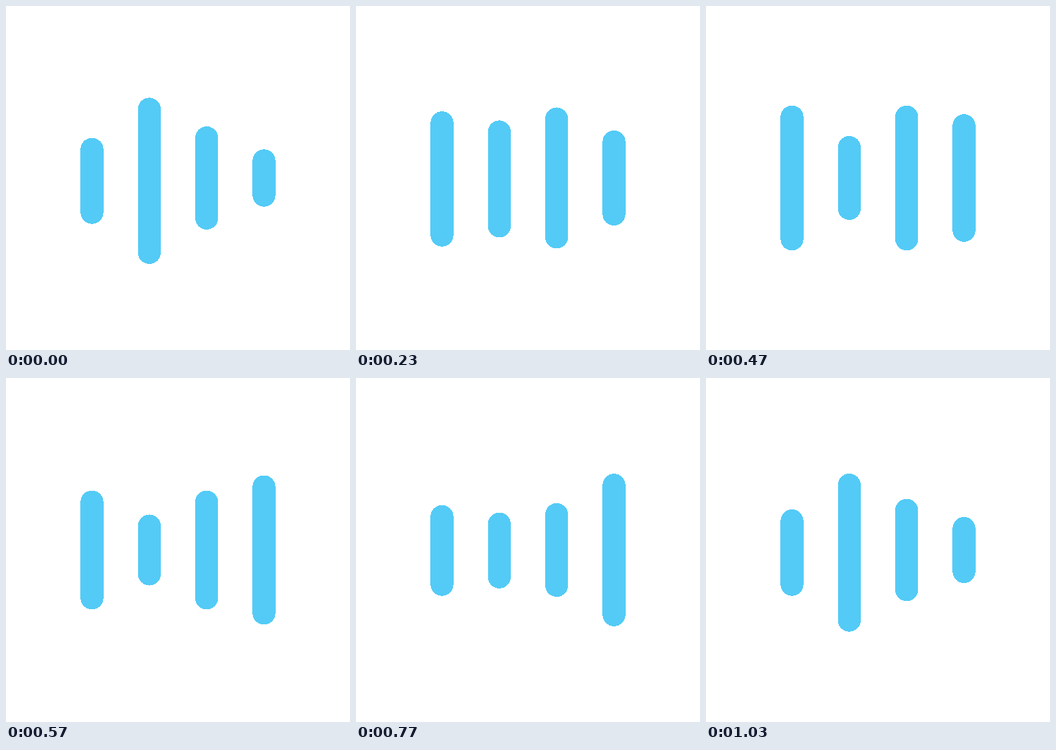
An HTML page for the animation above (1060 ms loop, 500 px wide and 500 px high).

```html
<!DOCTYPE html>
<html lang="en">
<head>
<meta charset="utf-8">
<title>Sound bars</title>
<style>
  html, body { margin: 0; width: 100%; height: 100%; overflow: hidden; background: #fff; }
  svg { display: block; width: 100%; height: 100%; }
  rect { fill: #53cbf6; shape-rendering: crispEdges; }
</style>
</head>
<body>
<svg viewBox="0 0 60 60"></svg>
<script>
const LOOP = 1060;
const FPS = 30;
const HELD_STEP = 14;
const MIDDLE = 30;
const WIDTH = 4;
const GAP = 10;

// Heights of each bar at the three key poses, from left to right.
const HEIGHTS = [[15, 28, 16], [29, 16, 10], [18, 28, 16], [10, 20, 30]];

const svg = document.querySelector('svg');
const rects = HEIGHTS.map((_, n) => {
  const rect = document.createElementNS('http://www.w3.org/2000/svg', 'rect');
  rect.setAttribute('x', MIDDLE + (n - 1.5) * GAP - WIDTH / 2);
  rect.setAttribute('width', WIDTH);
  rect.setAttribute('rx', WIDTH / 2);
  return svg.appendChild(rect);
});

const mix = (a, b, p) => a + (b - a) * p;

// Odd heights reach one unit further down than up.
const topOf = height => MIDDLE - Math.floor(height / 2);

// Steps start on whole hundredths of a second; one step repeats the pose before it.
function stepAt(ms) {
  const step = Math.floor((Math.floor(ms / 10) * 3 + 1) / 10);
  return step === HELD_STEP ? step - 1 : step;
}

function draw(ms) {
  const phase = stepAt(ms % LOOP) * 1000 / FPS / LOOP * 3;
  const pose = Math.floor(phase);
  HEIGHTS.forEach((heights, n) => {
    const from = heights[pose];
    const to = heights[(pose + 1) % heights.length];
    rects[n].setAttribute('y', mix(topOf(from), topOf(to), phase - pose));
    rects[n].setAttribute('height', mix(from, to, phase - pose));
  });
}

const start = performance.now();
function tick() {
  draw(performance.now() - start);
  requestAnimationFrame(tick);
}
tick();
</script>
</body>
</html>
```
